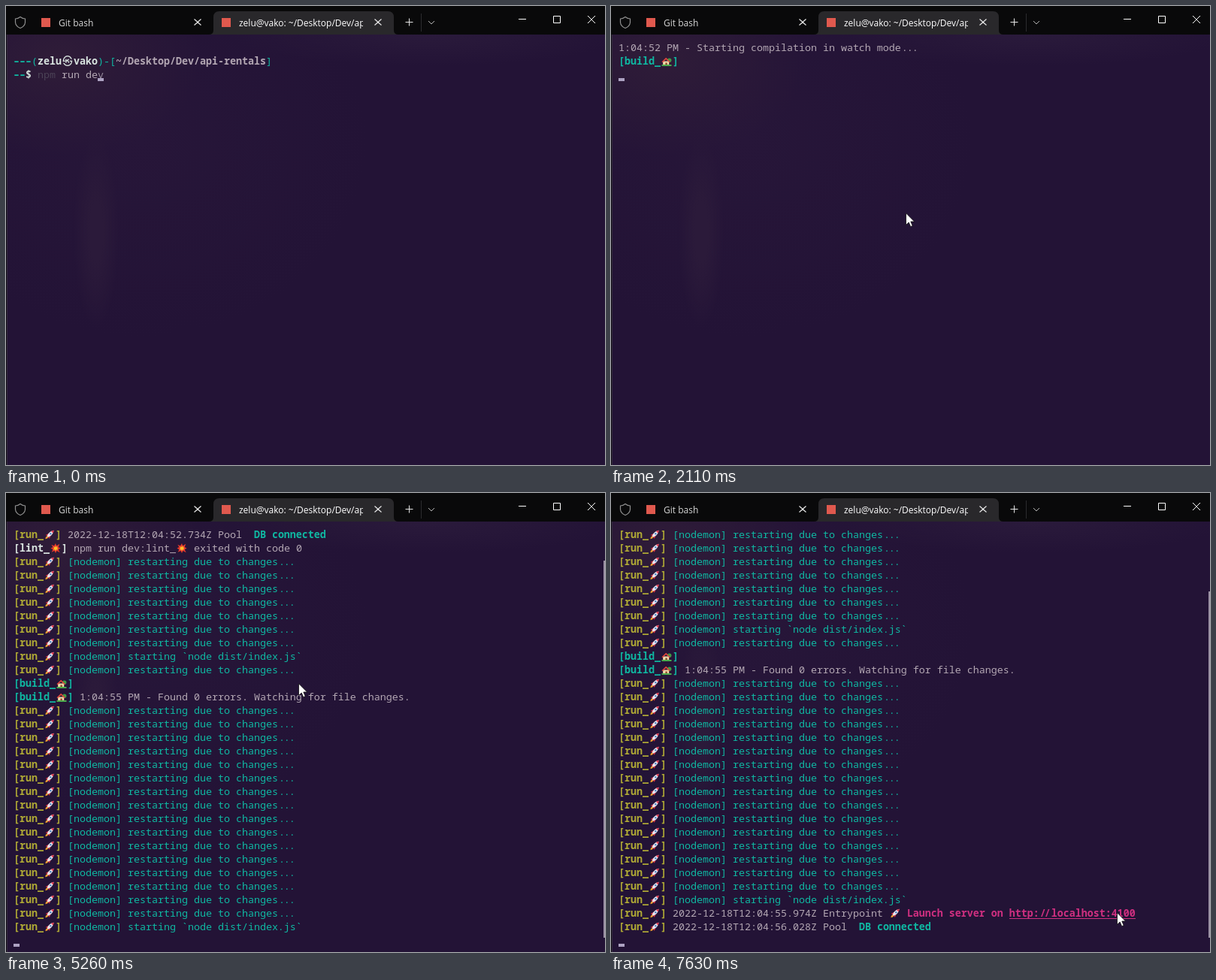
An HTML page that plays this animation: 797x611 px, repeating every 8 s.

```html
<!DOCTYPE html>
<html lang="en">
<head>
<meta charset="utf-8">
<title>Terminal session</title>
<style>
  html, body { margin: 0; width: 100%; height: 100%; overflow: hidden; background: #231336; }
  #stage { position: relative; width: 797px; height: 611px; overflow: hidden; background:
      radial-gradient(ellipse 30px 130px at 120px 300px, #2b1a3a 30%, #2b1a3a00),
      radial-gradient(ellipse 190px 130px at 70px 70px, #2f1c38, #2f1c3800),
      radial-gradient(ellipse 260px 40px at 560px 40px, #2a1a3b, #2a1a3b00),
      radial-gradient(ellipse 300px 260px at 180px 180px, #271639, #27163900),
      #231336; }
  #stage > * { position: absolute; }
  #edge { left: 0; top: 0; width: 1px; height: 611px; background: #120c1a; border-right: 1px solid #332b3d; }
  #bar { left: 0; top: 0; }
  .title { top: 13px; font: 12px/20px "Open Sans", "Noto Sans", sans-serif; color: #d6d6d6; white-space: pre; overflow: hidden; }
  #rows { left: 10px; top: 46px; font: 13.333px/18px "Noto Sans Mono", "DejaVu Sans Mono", monospace;
    font-variant-ligatures: none; color: #b3a7b3; white-space: pre; }
  #rows div { height: 18px; }
  #rows i { display: inline-block; height: 18px; font-style: normal; text-align: center; vertical-align: top; }
  .wide { width: 16px; }
  .wide svg { display: block; margin: 3px 1px; }
  .sign { font-family: "Noto Sans CJK KR", "Noto Sans CJK JP", sans-serif; }
  .slash { width: 16px; letter-spacing: -2px; text-indent: -2px; }
  .dots { width: 24px; letter-spacing: -1px; text-indent: -1px; }
  .teal { color: #0fb8a2; }
  .olive { color: #b0aa35; }
  .white { color: #d9e4e0; }
  .pink { color: #cf2f80; }
  .dim { color: #4b4256; }
  .half { color: #94899a; }
  .hover .url { background: linear-gradient(#cf2f80, #cf2f80) 0 16px / 100% 1px no-repeat; }
  #caret { width: 8px; height: 4px; background: #ada2c2; }
  #thumb { left: 795px; width: 2px; background: #9a90a3; }
  #mouse { left: 0; top: 0; }
</style>
</head>
<body>
<div id="stage">
  <div id="edge"></div>
  <svg id="bar" width="797" height="38" fill="none" stroke="#e6e6e6">
    <path d="M0 0H797V38H0Z" fill="#09090a" stroke="none"/>
    <path d="M270 38Q276 38 276 32V15Q276 7 284 7H508Q516 7 516 15V32Q516 38 522 38Z" fill="#29282b" stroke="none"/>
    <path d="M19 14.5Q22 17 25.5 17V22Q25 27 19 29.5Q13 27 12.5 22V17Q16 17 19 14.5Z" stroke="#8f8f8f" stroke-width="1.2"/>
    <path d="M47 16H59V28H47ZM287 16H299V28H287Z" fill="#e0594e" stroke="none"/>
    <path d="M250.500 17.500l9 8m0-8l-9 8M490.500 17.500l9 8m0-8l-9 8" stroke-width="1.2"/>
    <path d="M531.500 21.500h10m-5-5v10"/>
    <path d="M552.500 10v24" stroke="#2c2c2e"/>
    <path d="M562 20l4 4 4-4" stroke="#b5b5b5"/>
    <path d="M682 17.500h10M728.500 13.500h9v9h-9ZM774 13l10 10m0-10l-10 10" stroke="#fff"/>
  </svg>
  <div class="title" style="left:70px">Git bash</div>
  <div class="title" style="left:310px;width:165px;color:#fff;font-weight:500">zelu@vako: ~/Desktop/Dev/api-rentals</div>
  <div id="rows"></div>
  <div id="caret"></div>
  <div id="thumb"></div>
  <svg id="mouse" width="14" height="20">
    <path d="M.5.8V16.500L4.200 13 6.700 18.700 9.200 17.600 6.800 12H11.600Z" fill="#fff" stroke="#111" stroke-width=".8"/>
  </svg>
</div>

<svg width="0" height="0" style="position:absolute">
  <symbol id="house" viewBox="0 0 16 16">
    <circle cx="12.500" cy="6.500" r="3.400" fill="#3f9a45"/>
    <path d="M2 8H12V15H2Z" fill="#f0d7a8"/>
    <path d="M0 9L7 2 14 9 12.500 10.300 7 5 1.500 10.300Z" fill="#e2453c"/>
    <path d="M6 10.500H9V15H6Z" fill="#8a4b2b"/>
    <path d="M0 13.500H16V16H0Z" fill="#4bab4c"/>
  </symbol>
  <symbol id="rocket" viewBox="0 0 16 16">
    <path d="M1 15Q1 11 4 10L6 12Q5 15 1 15Z" fill="#f6a030"/>
    <path d="M6 6L1.500 8.500 4.500 10.500ZM10 10L7.500 14.500 5.500 11.500Z" fill="#d92f42"/>
    <path d="M4 10.500Q6 3 15 1Q13 10 5.500 12Z" fill="#ece6ee"/>
    <path d="M10.500 2.500Q12.500 1.300 15 1Q14.700 3.500 13.500 5.500Z" fill="#e0344a"/>
    <circle cx="9.600" cy="6.400" r="1.500" fill="#4a83c4"/>
  </symbol>
  <symbol id="boom" viewBox="0 0 16 16">
    <path d="M1 2L5.500 4 8 0 9.500 4 14.500 1 12.500 6 16 8 12.500 10 15 15 9.800 12.300 8 16 6 12.300 1.500 14.500 3.500 10 0 8 3.500 6.300Z" fill="#e5382c"/>
    <path d="M5 5.500L7.500 6 8.300 3.500 9.300 6 11.500 5.500 10.800 8 12 10 9.500 10 8 12.500 6.800 10 4.300 10.500 5.400 8Z" fill="#fbc02d"/>
  </symbol>
</svg>

<script>
const LOOP = 8000, CELL = 8, LINE = 18, LEFT = 10, TOP = 46;
const $ = id => document.getElementById(id);
const paint = (color, text) => `<span class="${color}">${text}</span>`;
const bold = (color, text) => `<b class="${color}">${text}</b>`;
const icon = id => `<i class="wide"><svg width="14" height="13"><use href="#${id}"/></svg></i>`;
const repeat = (n, line) => Array(n).fill(line);
const dots = '<i class="dots">...</i>';

const house = icon('house'), rocket = icon('rocket'), boom = icon('boom');
const build = bold('teal', `[build_${house}]`);
const run = bold('olive', `[run_${rocket}]`);
const lint = bold('white', `[lint_${boom}]`);

const prompt = bold('teal', '–––') + paint('teal', '(') +
  bold('white', 'zelu<i class="wide sign">㉿</i>vako') + paint('teal', ')-[') +
  '<b>~/Desktop/Dev/api-rentals</b>' + paint('teal', ']');
const command = v => bold('teal', '––') + bold('white', '$') + ' ' + paint('dim', 'npm') + ' run de' + v;
const task = (tag, name, script) => [
  tag, `${tag} &gt; api-rentolio@1.0.0 dev:${name}`, `${tag} &gt; ${script}`, tag];

const typing = ['', prompt, command(paint('half', 'v'))];
const shell = [
  '', prompt, command('v'), '',
  '&gt; api-rentolio@1.0.0 dev',
  '&gt; concurrently "npm:dev:*" -c green.bold,yellow.bold,blue.bold', '',
  ...task(build, 'build_' + house, 'tsc -w'),
  ...task(run, 'run_' + rocket, 'nodemon dist/index.js'),
  ...task(lint, 'lint_' + boom, 'eslint . --ext .ts')];

const nodemon = text => `${run} ${paint('teal', '[nodemon] ' + text)}`;
const restart = nodemon('restarting due to changes' + dots);
const start = nodemon('starting `node dist/index.js`');
const launch = (time, cls = '') => `${run} 2022-12-18T12:04:${time}Z Entrypoint ${rocket} ` +
  bold('pink', `Launch server on <span class="${cls}">http:<i class="slash">//</i>localhost:4100</span>`);
const pool = time => `${run} 2022-12-18T12:04:${time}Z Pool  ${bold('teal', 'DB connected')}`;

const log = [
  '1:04:52 PM - Starting compilation in watch mode' + dots, build,
  launch('52.683'), pool('52.734'),
  `${lint} npm run dev:lint_${boom} exited with code 0`,
  ...repeat(7, restart), start, restart, build,
  `${build} 1:04:55 PM - Found 0 errors. Watching for file changes.`,
  ...repeat(16, restart), start,
  launch('55.974', 'url'), pool('56.028')];

// Each scene: start time, visible lines, then whatever differs from the defaults.
const scene = (at, lines, more) => ({ at, lines, row: lines.length, col: 0, ...more });
const tail = log.slice(5);
const end = (at, x, y, hover) => scene(at, tail, { mouse: [x, y], thumb: 131, hover });
const rest = [389, 253];
const scenes = [
  scene(0, typing, { row: 2, col: 14 }),
  scene(270, shell.slice(0, 3), { row: 2, col: 15 }),
  scene(840, shell.slice(0, 3)),
  scene(1270, shell.slice(0, 7)),
  scene(1810, shell),
  scene(1960, []),
  scene(2110, log.slice(0, 2), { mouse: [392, 275] }),
  scene(2260, log.slice(0, 4), { mouse: rest }),
  scene(2980, log.slice(0, 5), { mouse: rest }),
  scene(5110, log.slice(0, 20), { mouse: rest }),
  scene(5260, log.slice(3, 33), { mouse: rest, thumb: 90 }),
  scene(5530, log.slice(4, 34), { mouse: rest, thumb: 111 }),
  end(5660, ...rest),
  end(6800, 475, 436),
  end(6950, 463, 569),
  end(7100, 575, 574),
  end(7250, 728, 547),
  end(7510, 690, 555, true),
  end(7630, 673, 558, true)];

const [rows, caret, thumb, mouse] = ['rows', 'caret', 'thumb', 'mouse'].map($);
let shown;

function draw(s) {
  if (!shown || shown.lines !== s.lines)
    rows.innerHTML = s.lines.map(line => `<div>${line}</div>`).join('');
  rows.className = s.hover ? 'hover' : '';
  caret.style.left = LEFT + s.col * CELL + 'px';
  caret.style.top = TOP + (s.row + 1) * LINE - 4 + 'px';
  thumb.style.display = s.thumb ? '' : 'none';
  thumb.style.top = s.thumb + 'px';
  thumb.style.height = 592 - s.thumb + 'px';
  mouse.style.display = s.mouse ? '' : 'none';
  if (s.mouse) mouse.style.transform = `translate(${s.mouse[0]}px, ${s.mouse[1]}px)`;
  shown = s;
}

function tick() {
  const t = performance.now() % LOOP;
  const now = scenes.findLast(s => s.at <= t);
  if (now !== shown) draw(now);
  requestAnimationFrame(tick);
}
tick();
</script>
</body>
</html>
```
